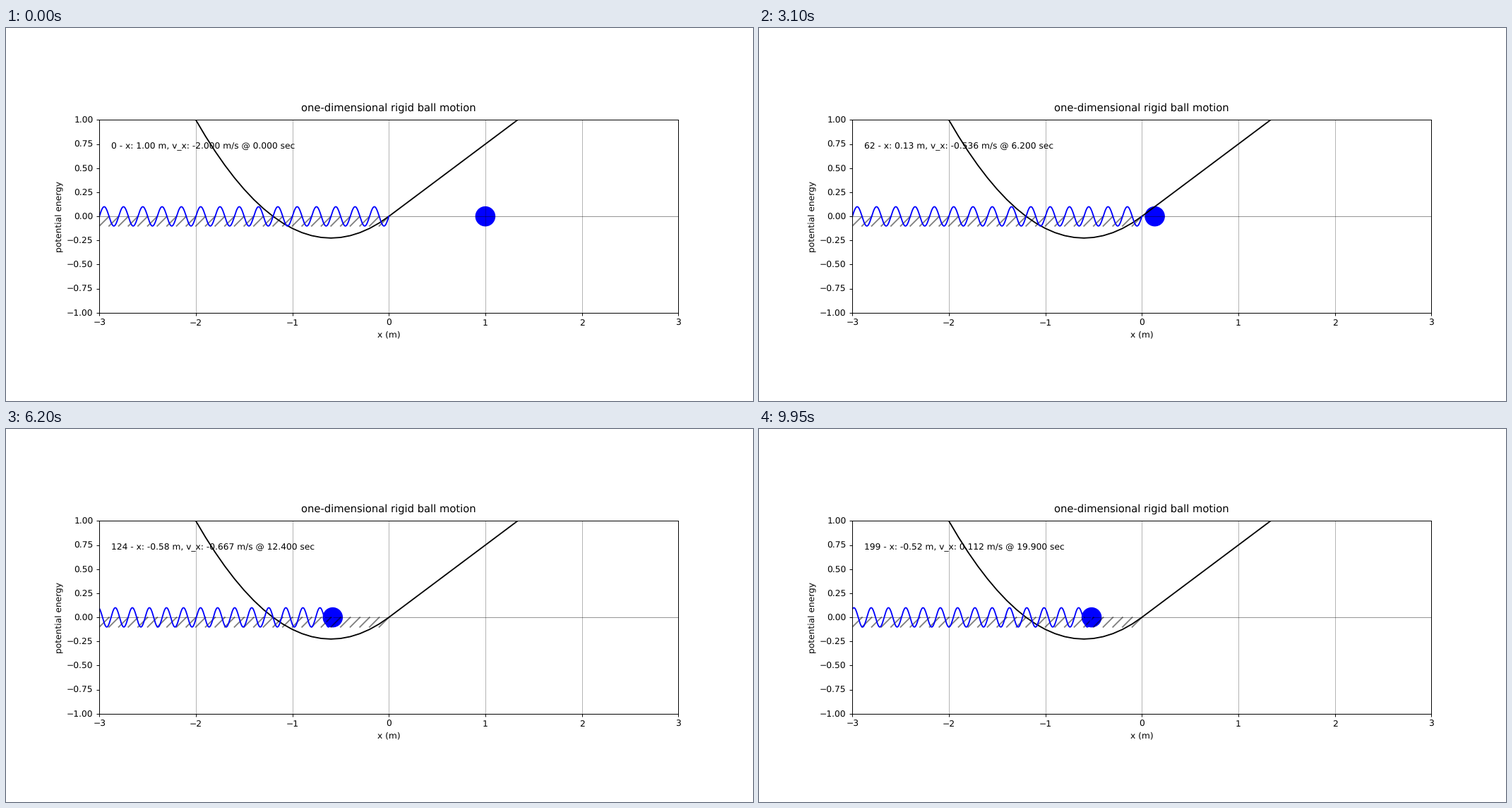
Write a matplotlib script that moves like this. It is 1058 by 529 pixels and loops after 10 s.

```python
import matplotlib.pyplot as plt
import numpy as np
from matplotlib.animation import FuncAnimation
from matplotlib.patches import Circle

FRAMES, INTERVAL = 200, 50
FRAME_DT, SUBSTEPS = 0.1, 200
GRAVITY, STIFFNESS, DAMPING = 3.0, 5.0, 0.2999  # per unit mass
MASS = 0.25
RADIUS = 0.1
SPRING_LENGTH, COIL = 5.0, 0.2

plt.rcParams["text.hinting"] = "no_hinting"


def simulate():
    """Ball falling onto a damped spring that only pushes for x < 0."""
    x, v = 1.0, -2.0
    dt = FRAME_DT / SUBSTEPS
    states = []
    for _ in range(FRAMES):
        states.append((x, v))
        for _ in range(SUBSTEPS):
            a = -GRAVITY
            if x < 0:
                a -= STIFFNESS * x + DAMPING * v
            v += a * dt
            x += v * dt
    return states


def potential(x):
    return MASS * (GRAVITY * x + np.where(x < 0, STIFFNESS * x**2 / 2, 0))


states = simulate()
coil_u = np.linspace(-SPRING_LENGTH, 0, 1001)
coil_y = RADIUS * np.sin(2 * np.pi * coil_u / COIL)

fig, ax = plt.subplots(figsize=(12, 6), dpi=1058 / 12)
ax.set(xlim=(-3, 3), ylim=(-1, 1), aspect="equal", xlabel="x (m)",
       ylabel="potential energy")
ax.set_title("one-dimensional rigid ball motion", pad=10.4)
ax.grid(axis="x", color="black", alpha=0.3)
ax.axhline(0, color="black", lw=0.8, alpha=0.42)

# Ground strokes under the spring
for left in np.arange(-30, 0) / 10:
    ax.plot([left, left + 0.1], [-RADIUS, 0], color="black", alpha=0.5)

xs = np.linspace(-3, 3, 61)
ax.plot(xs, potential(xs), color="black")
spring, = ax.plot([], [], color="blue")
ball = ax.add_patch(Circle((1, 0), RADIUS, color="blue"))
label = ax.text(0.02, 0.85, "", transform=ax.transAxes)


def update(i):
    x, v = states[i]
    end = min(x, 0)
    spring.set_data(end + coil_u * (1 + end / SPRING_LENGTH), coil_y)
    ball.center = x, 0
    label.set_text(f"{i} - x: {x:.2f} m, v_x: {v:.3f} m/s"
                   f" @ {i * FRAME_DT:.3f} sec")
    return spring, ball, label


anim = FuncAnimation(fig, update, frames=FRAMES, interval=INTERVAL,
                     repeat=True, repeat_delay=0)
plt.show()
```
